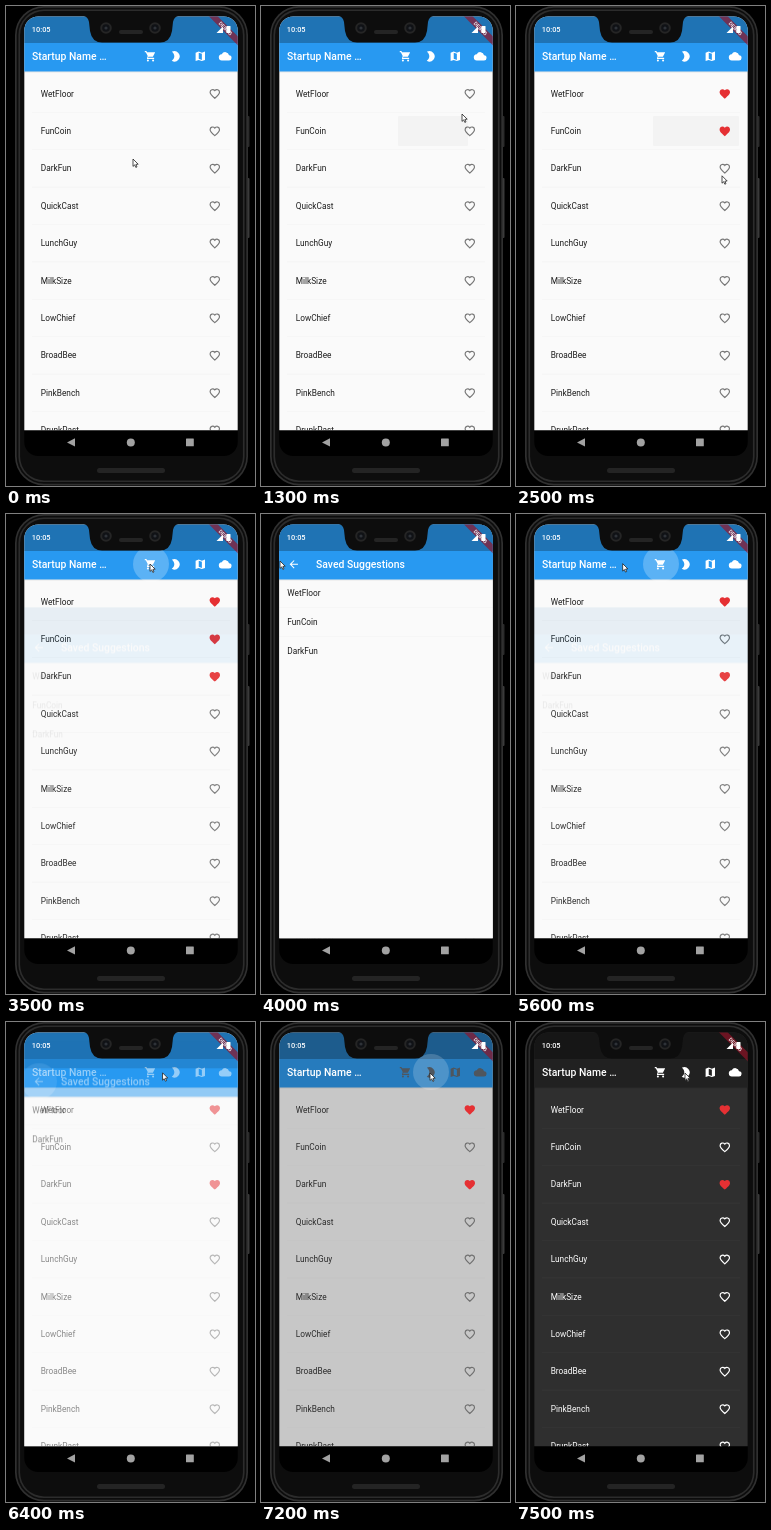
An HTML page with a canvas for the animation above (8000 ms loop, 249 px wide and 480 px high).

```html
<!DOCTYPE html>
<html lang="en">
<head>
<meta charset="utf-8">
<title>Startup names</title>
<style>
  html, body { margin: 0; width: 100%; height: 100%; overflow: hidden; background: #000; }
  canvas { display: block; }
</style>
</head>
<body>
<canvas id="stage" width="249" height="480"></canvas>
<script>
const LOOP = 8000, STEP = 100, ROW = 37.4;
const names = ['WetFloor', 'FunCoin', 'DarkFun', 'QuickCast', 'LunchGuy',
  'MilkSize', 'LowChief', 'BroadBee', 'PinkBench', 'DrunkPast'];

// Icons on a 24 unit grid
const wheel = x => `M${x} 20a2 2 0 1 0 4 0a2 2 0 1 0-4 0z`;
const icon = {
  heart: new Path2D('M12 21.3C4 14.2 2 12 2 8.5C2 3 8.6 1 12 5.1C15.4 1 22 3 22 8.5C22 12 20 14.2 12 21.3z'),
  cart: new Path2D('M1 2H4.3L5.2 4H21L16.6 13H8.2L7.2 15H19V17H5L6.6 11.6 3 4H1z' + wheel(5) + wheel(15)),
  moon: new Path2D('M5 3.4A10 10 0 1 1 5 20.6A10 10 0 0 0 5 3.4z'),
  map: new Path2D('M3 5L9 3 15 5.1 21 3V19L15 21.1 9 18.9 3 21zM15 19V7.1L9 5V16.9z'),
  cloud: new Path2D('M19.4 10A7.5 7.5 0 0 0 5.4 8A6 6 0 0 0 6 20H19A5 5 0 0 0 19.4 10z'),
  back: new Path2D('M20 11H7.8L13.4 5.4 12 4 4 12 12 20 13.4 18.6 7.8 13H20z')
};

// Places the pointer visits
const rest = { x: 127, y: 153 }, hover = { x: 201, y: 108 }, edge = { x: 19, y: 47 };
const cart = { x: 144, y: 50 }, back = { x: 32, y: 49 }, moon = { x: 169, y: 51 };
const hearts = [0, 1, 2].map(row => ({ x: 206, y: 95 + row * ROW }));

const go = (to, leave, reach, tap = Infinity) => ({ to, leave, reach, tap });
const moves = [
  go(hover, 1000, 1300),
  go(hearts[0], 1400, 1600, 1600),
  go(hearts[1], 1900, 2100, 2200),
  go(hearts[2], 2300, 2500, 2800),
  go(cart, 2800, 3200, 3400),
  go(edge, 3500, 4000),
  go(back, 4000, 4300, 4300),
  go(hearts[1], 4900, 5200, 5300),
  go(cart, 5300, 5500, 5500),
  go(back, 5500, 5800, 6200),
  go(moon, 6200, 6420, 7000)
];
const tapsOn = spot => moves.filter(m => m.to === spot).map(m => m.tap);

const stage = document.getElementById('stage');
const layer = new OffscreenCanvas(249, 480);
const stageCtx = stage.getContext('2d'), layerCtx = layer.getContext('2d');
let c = stageCtx;

const clamp = v => Math.max(0, Math.min(1, v));
const sum = list => list.reduce((a, b) => a + b, 0);
const mix = (a, b, k) => `rgba(${a.map((v, i) => v + (b[i] - v) * k)})`;

function bezier(x1, y1, x2, y2) {
  const at = (a, b, s) => 3 * (1 - s) * s * ((1 - s) * a + s * b) + s ** 3;
  return x => {
    let lo = 0, hi = 1;
    for (let i = 0; i < 20; i++) {
      const mid = (lo + hi) / 2;
      if (at(x1, x2, mid) < x) lo = mid; else hi = mid;
    }
    return at(y1, y2, lo);
  };
}
const slideEase = bezier(.4, 0, .2, 1), fadeEase = bezier(.42, 0, 1, 1);

function rect(x, y, w, h, fill, r = 0) {
  c.fillStyle = fill;
  c.beginPath();
  c.roundRect(x, y, w, h, r);
  c.fill();
}
function disc(x, y, r, fill) {
  c.fillStyle = fill;
  c.beginPath();
  c.arc(x, y, r, 0, 7);
  c.fill();
}
function text(str, x, y, size, fill, weight = 400) {
  c.font = `${weight} ${size}px Roboto, sans-serif`;
  c.fillStyle = fill;
  c.fillText(str, x, y);
}
function shape(path, fill) {
  c.fillStyle = fill;
  c.fill(new Path2D(path));
}
function clipTo(x, y, w, h, r = 0) {
  c.beginPath();
  c.roundRect(x, y, w, h, r);
  c.clip();
}
function drawIcon(path, x, y, color, outline) {
  const scale = outline ? .47 : .52;
  c.save();
  c.translate(x, y);
  c.scale(scale, scale);
  c.translate(-12, -12);
  c.lineWidth = 2.5;
  c.strokeStyle = c.fillStyle = color;
  if (outline) c.stroke(path); else c.fill(path);
  c.restore();
}

function themeAt(t) {
  const k = clamp((t - tapsOn(moon)[0] - 150) / 200);
  return {
    back: mix([250, 250, 250], [47, 47, 47], k),
    bar: mix([40, 153, 241], [33, 33, 33], k),
    status: mix([31, 115, 180], [22, 22, 22], k),
    text: mix([28, 28, 28], [255, 255, 255], k * k),
    heart: mix([0, 0, 0, .52], [255, 255, 255, 1], k),
    line: mix([0, 0, 0, .03], [255, 255, 255, .04], k),
    icon: k ? mix([20, 30, 40], [255, 255, 255], k) : '#fff'
  };
}

const isLiked = (row, t) =>
  row < hearts.length && tapsOn(hearts[row]).filter(tap => tap <= t).length % 2 === 1;

function drawRipples(t, ...spots) {
  for (const spot of spots) for (const tap of tapsOn(spot)) {
    const age = t - tap;
    if (age < 0 || age >= 500) continue;
    disc(spot.x + 1, 50, Math.min(18, 10 + age * .08), `rgba(255,255,255,${.3 * (1 - age / 500)})`);
  }
}

function drawScaffold(theme) {
  rect(18, 10, 214, 415, theme.back);
  rect(18, 10, 214, 27, theme.status);
  rect(18, 37, 214, 28.4, theme.bar);
  rect(18, 65.4, 214, 1, 'rgba(0,0,0,.08)');
}

function drawHome(t, theme) {
  drawScaffold(theme);
  text('Startup Name …', 26, 54, 10.4, '#fff', 500);
  drawRipples(t, cart, moon);
  ['cart', 'moon', 'map', 'cloud'].forEach((n, i) =>
    drawIcon(icon[n], 144.5 + i * 24.9, 50.3, theme.icon));
  if (t >= 1300 && t < 3000) rect(137, 110, t < 2000 ? 70 : 86, 30, '#f3f3f3', 1);
  names.forEach((name, row) => {
    const y = 87.6 + row * ROW, liked = isLiked(row, t);
    text(name, 34.7, y + 3, 8.3, theme.text);
    drawIcon(icon.heart, 208.8, y + .3, liked ? '#e53033' : theme.heart, !liked);
    rect(26, y + 18.4, 198, .6, theme.line);
  });
}

function drawSaved(t, theme) {
  drawScaffold(theme);
  drawRipples(t, back);
  drawIcon(icon.back, 32.8, 50.3, '#fff');
  text('Saved Suggestions', 55, 54, 10.4, '#fff', 500);
  names.filter((_, row) => isLiked(row, t)).forEach((name, i) => {
    const y = 79.3 + i * 29;
    if (i) rect(18, y - 14.8, 214, .6, theme.line);
    text(name, 26.3, y + 3, 8.3, theme.text);
  });
}

function drawSavedOver(t, theme) {
  const passed = (spot, delay) => sum(tapsOn(spot).map(tap => clamp((t - tap - delay) / 300)));
  const shown = passed(cart, 30) - passed(back, 95);
  if (shown <= 0) return;
  c = layerCtx;
  c.clearRect(0, 0, 249, 480);
  drawSaved(t, theme);
  c = stageCtx;
  c.globalAlpha = fadeEase(shown);
  c.drawImage(layer, 0, 104 * (1 - slideEase(shown)));
  c.globalAlpha = 1;
}

function drawRibbon() {
  c.save();
  c.translate(219.5, 22.5);
  c.rotate(Math.PI / 4);
  rect(-25, -3.1, 50, 6.2, 'rgba(150,20,40,.68)');
  c.textAlign = 'center';
  text('DEBUG', 0, 1.9, 5.3, 'rgba(255,255,255,.85)', 700);
  c.restore();
}

function drawScreen(t) {
  const theme = themeAt(t);
  c.save();
  clipTo(18.3, 10.4, 213.4, 439.6, 14);
  rect(18, 10, 214, 440, '#000');
  c.save();
  clipTo(18, 10, 214, 414.3);
  drawHome(t, theme);
  drawSavedOver(t, theme);
  drawRibbon();
  c.restore();

  text('10:05', 25.8, 26, 7.4, '#fff', 500);
  shape('M210.5 27H217V20.5z', '#fff');
  rect(220.5, 20, 4, 7, '#fff', .6);
  shape('M61 436.4L69 432.2V440.6z', '#a2a2a2');
  disc(124.8, 436.4, 4, '#a2a2a2');
  rect(180, 432.5, 7.8, 7.8, '#a2a2a2', .5);
  c.restore();
}

function drawPhone() {
  rect(0, 0, 249, 480, '#000');
  rect(241, 110, 2.5, 31, '#2b2b2b', 1);
  rect(241, 172, 2.5, 60, '#3a3a3a', 1);
  // Nested rims from the outer edge inwards
  ['#303030', '#0c0c0c', '#2c2c2c', '#0d0d0d'].forEach((fill, i) => {
    const inset = i * 1.7;
    rect(9 + inset, inset, 233 - 2 * inset, 479.5 - 2 * inset, fill, 29 - inset);
  });
  rect(91, 462, 68, 5, '#242424', 2.5);
}

function drawNotch() {
  shape('M78 10Q82 11 83 16L84 25Q86 36.5 96 36.5H154Q164 36.5 166 25L167 16Q168 11 172 10z', '#0d0d0d');
  for (const x of [100, 149]) {
    disc(x, 22, 5.8, '#252525');
    disc(x, 22, 3.8, '#101216');
    disc(x, 22, 1.6, '#2e3238');
  }
  rect(113, 24, 24, 4, '#242424', 2);
}

function drawPointer(t) {
  let { x, y } = rest;
  for (const { to, leave, reach } of moves) {
    const k = clamp((t - leave) / (reach - leave));
    x += (to.x - x) * k;
    y += (to.y - y) * k;
  }
  c.save();
  c.translate(x, y);
  const arrow = new Path2D('M0 0V7.4L1.7 5.9 2.8 8.4 4 7.9 2.9 5.4 5.2 5.2z');
  c.fillStyle = '#fff';
  c.fill(arrow);
  c.strokeStyle = '#222';
  c.lineWidth = .8;
  c.stroke(arrow);
  c.restore();
}

function frame(now) {
  const t = Math.floor(now % LOOP / STEP) * STEP;
  drawPhone();
  drawScreen(t);
  drawNotch();
  drawPointer(t);
  requestAnimationFrame(frame);
}
requestAnimationFrame(frame);
</script>
</body>
</html>
```
